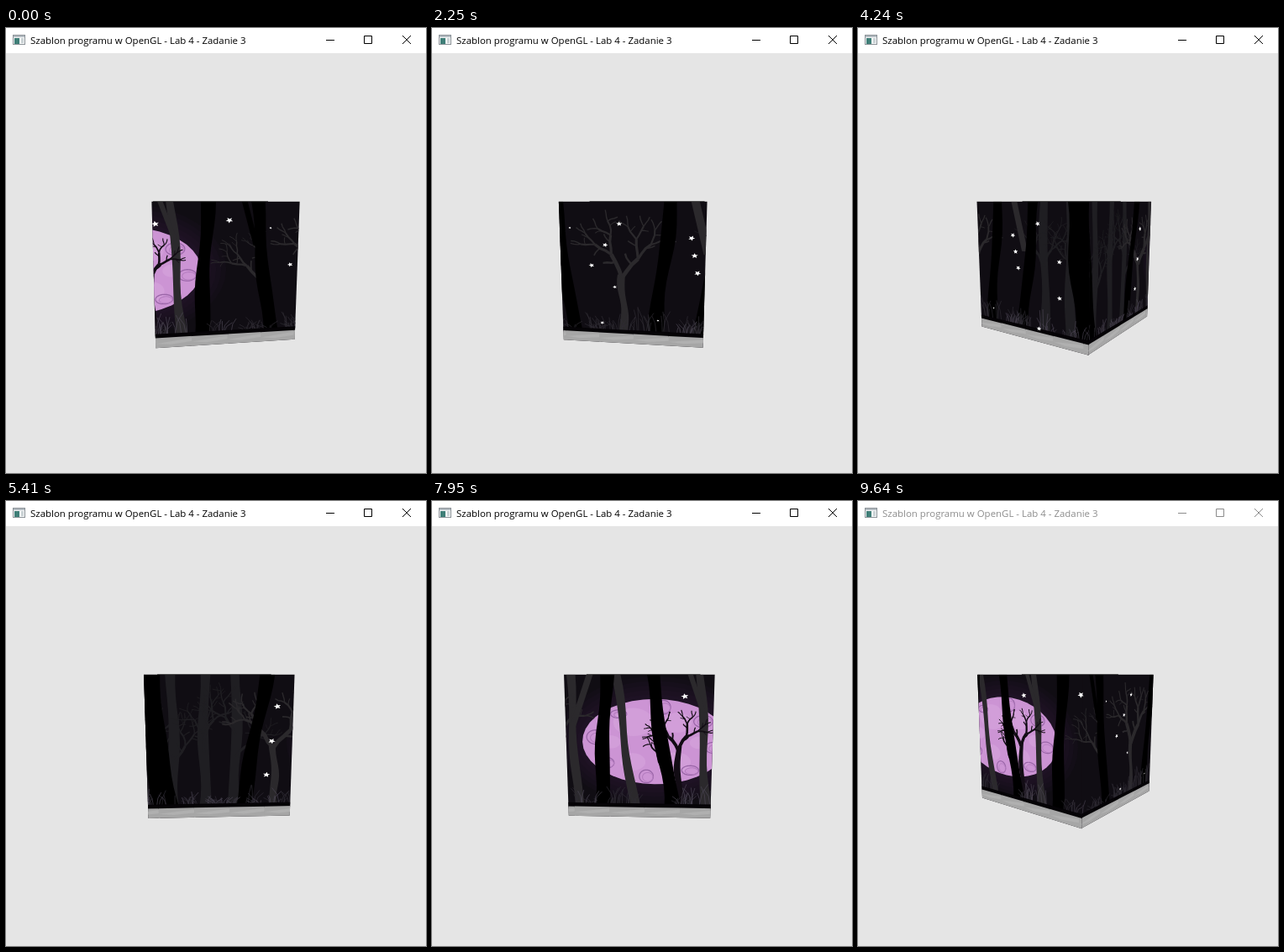
An HTML page with a canvas for the animation above (9720 ms loop, 500 by 530 pixels).

```html
<!DOCTYPE html>
<html lang="pl">
<head>
<meta charset="utf-8">
<title>Szablon programu w OpenGL</title>
<style>
html, body { margin: 0; width: 100%; height: 100%; overflow: hidden; background: #e5e5e5; }
canvas, svg { position: absolute; left: 0; top: 0; display: block; }
text { font: 11.45px "Open Sans", "Noto Sans", sans-serif; }
</style>
</head>
<body>
<canvas id="view" width="500" height="530"></canvas>
<svg width="500" height="30" viewBox="0 0 500 30">
  <rect width="500" height="30" fill="#fff"/>
  <rect x="8.5" y="8.5" width="14" height="11" fill="#f4f6f7" stroke="#8b9297"/>
  <rect x="9" y="9" width="13" height="2" fill="#b4bcc2"/>
  <rect x="10" y="12" width="6" height="7" fill="#3f7f78"/>
  <rect x="18" y="12" width="3" height="6" fill="#ccd3d6"/>
  <g id="bar">
    <text x="29" y="19">Szablon programu w OpenGL - Lab 4 - Zadanie 3</text>
    <path d="M381 14.5h10M426.5 9.5h9v9h-9zM472 9l10 10M482 9l-10 10" fill="none" stroke="#000"/>
  </g>
</svg>
<script>
const LOOP = 9720, STEP = 76.5, FOCAL = 440, DIST = 6, WRAP = 8;
const TILT = Math.atan(1 / DIST), C = Math.cos(TILT), S = Math.sin(TILT);
const FLOOR = 1.857, MOON = { x: 6.63, y: 0.92, rx: 1, ry: 0.595 };
const FAR = '#1f1e22', GRAY = '#2b292c', BLACK = '#000', INK = '#120c14';
const ctx = document.getElementById('view').getContext('2d');
const bar = document.getElementById('bar');

let seed = 11;
const rnd = (a = 0, b = 1) => {
  seed = (seed * 16807) % 2147483647;
  return a + (b - a) * seed / 2147483647;
};

// The forest is a strip: x runs 0..8 round the box, y runs 0..2 downwards.
const shapes = [];
function add(pts, color, width = 0, alpha = 1) {
  const xs = pts.map(p => p[0]);
  const lo = Math.min(...xs), hi = Math.max(...xs);
  shapes.push({ pts, color, width, alpha, mid: (lo + hi) / 2, half: (hi - lo) / 2 });
}

function oval(x, y, rx, ry, color, width, alpha) {
  const pts = [];
  for (let i = 0; i <= 40; i++) {
    const a = i * Math.PI / 20;
    pts.push([x + rx * Math.cos(a), y + ry * Math.sin(a)]);
  }
  add(pts, color, width, alpha);
}

function trunk(top, lean, size, color, from = 0) {
  const left = [], right = [], p = rnd(0, 6);
  for (let i = 0; i <= 12; i++) {
    const k = i / 12, y = from + (FLOOR - from) * k;
    const x = top + lean * k + 0.02 * Math.sin(p + k * 7);
    const w = size / 2 * (0.9 + 0.12 * Math.sin(p * 2 + k * 9) + 0.3 * k ** 5);
    left.push([x - w, y]);
    right.unshift([x + w, y]);
  }
  add(left.concat(right), color);
}

function fork(x, y, lean, size, color) {
  add([[x - size / 2, y], [x + size / 2, y], [x + lean + size / 2, 0], [x + lean - size / 2, 0]], color);
}

function twig(x, y, angle, len, width, depth, color) {
  const pts = [[x, y]];
  let a = angle;
  for (let i = 0; i < 3; i++) {
    a += rnd(-0.35, 0.35);
    x += Math.sin(a) * len / 3;
    y -= Math.cos(a) * len / 3;
    pts.push([x, y]);
  }
  add(pts, color, width);
  if (!depth) return;
  const next = side => twig(x, y, angle + side * rnd(0.2, 0.6), len * 0.75, width * 0.66, depth - 1, color);
  next(-1);
  next(1);
  twig(...pts[2], angle + (rnd() < 0.5 ? -0.9 : 0.9), len * 0.5, width * 0.5, 0, color);
}

function tree(x, y, reach, width, color) {
  trunk(x, 0.03, width * 2, color, y - 0.05);
  twig(x, y, -0.6, reach, width, 3, color);
  twig(x, y, 0.45, reach, width, 3, color);
}

function star(x, v, r) {
  const pts = [], turn = rnd(0, 6);
  for (let i = 0; i < 10; i++) {
    const a = turn + i * Math.PI / 5, q = r / 95 * (i % 2 ? 0.45 : 1);
    pts.push([x + q * Math.cos(a), v * 2 + 0.75 * q * Math.sin(a)]);
  }
  add(pts, '#fff');
}

function starRow(n, x, v, dx, dv, r) {
  for (let i = 0; i < n; i++) star(x + dx * i, v + dv * i, r);
}

function buildMoon() {
  const { x, y, rx, ry } = MOON;
  for (let i = 5; i; i--) oval(x, y, rx + i * 0.07, ry + i * 0.06, '#4a2a50', 0, 0.06);
  oval(x, y, rx, ry, '#cc94d4');
  for (let i = 0; i < 6; i++) {
    const a = i * 1.05, w = rnd(0.12, 0.3);
    oval(x + 0.6 * Math.cos(a), y + 0.32 * Math.sin(a), w, w * 0.7, '#d7a5de', 0, 0.6);
  }
  // a ring of craters just inside the rim
  for (let i = 0; i < 8; i++) {
    const a = 0.14 + i * Math.PI / 4, w = rnd(0.08, 0.16), h = rnd(0.05, 0.11);
    const cx = x + 0.82 * rx * Math.cos(a), cy = y + 0.82 * ry * Math.sin(a);
    oval(cx, cy, w, h, '#9a66a8', 0.015);
    oval(cx + 0.02, cy + 0.01, w * 0.75, h * 0.7, '#b57dc0', 0.012);
  }
}

function buildTrees() {
  for (let x = 2.85; x < 4.7; x += 0.43) {
    trunk(x, 0, 0.15, FAR);
    twig(x, rnd(0.8, 1.2), -0.5, 0.28, 0.035, 3, FAR);
    twig(x, rnd(0.8, 1.2), 0.5, 0.28, 0.035, 3, FAR);
  }
  twig(0.48, 1.1, -0.8, 0.3, 0.04, 3, GRAY);
  twig(0.45, 0.9, -0.4, 0.2, 0.03, 3, GRAY);

  for (const x of [5.48, 6.1, 7.23]) trunk(x, x < 6 ? 0.07 : x < 7 ? 0.25 : 0.13, 0.12, GRAY);
  fork(5.5, 0.7, 0.25, 0.09, GRAY);
  fork(7.28, 0.5, -0.18, 0.07, GRAY);
  fork(2.5, 0.7, -0.18, 0.11, GRAY);
  tree(1.33, 1.05, 0.36, 0.055, GRAY);
  tree(5.1, 1, 0.33, 0.055, GRAY);
  tree(6.95, 1.02, 0.22, 0.045, INK);
  twig(6.72, 1.25, -0.75, 0.2, 0.03, 2, INK);

  // top position and lean of each black trunk
  [[7.72, -0.09], [0.4, 0.22], [2, -0.2], [2.68, -0.24], [4.98, -0.3], [5.97, -0.09], [6.59, 0.29]]
    .forEach(([x, lean]) => trunk(x, lean, 0.2, BLACK));
  trunk(3.38, 0.17, 0.37, BLACK);
  fork(0.4, 0.6, -0.17, 0.08, BLACK);
}

function buildGround() {
  for (let i = 0; i < 60; i++) {
    const x = rnd(0, WRAP), tall = rnd(0.08, 0.32), tone = rnd() < 0.6 ? '#2f2c34' : '#4c4654';
    for (let j = 0; j < 5; j++) {
      const bx = x + rnd(-0.1, 0.1), h = tall * rnd(0.5, 1.2), lean = rnd(-0.12, 0.12);
      add([[bx, 1.83], [bx + lean * 0.3, 1.83 - h * 0.6], [bx + lean, 1.83 - h]], tone, 0.008);
    }
  }
  for (let x = 0; x < WRAP; x += 0.5) {
    const slab = (y0, y1, color) => add([[x - 0.01, y0], [x + 0.51, y0], [x + 0.51, y1], [x - 0.01, y1]], color);
    slab(1.8, FLOOR + 0.01, '#050306');
    slab(FLOOR, 2.03, '#a6a6a6');
    add([[x, 1.94], [x + 0.5, 1.88], [x + 0.5, 1.93], [x + 0.2, 1.96]], '#b0b0b0');
  }
}

function buildStars() {
  starRow(2, 0.02, 0.125, -0.99, 0.02, 5);
  starRow(3, 1.3, 0.15, -0.2, 0.145, 4);
  starRow(2, 1.23, 0.59, -0.19, 0.265, 3);
  starRow(3, 2.28, 0.24, 0.045, 0.118, 4.5);
  starRow(3, 5.14, 0.215, -0.065, 0.24, 5);
  starRow(2, 0.6, 0.18, 1.24, 0.64, 2);
  for (let i = 0; i < 4; i++) star(2.74 + 0.42 * Math.sin(i * Math.PI / 3), 0.15 + 0.25 * i, 4.3);
}

buildMoon();
buildTrees();
buildGround();
buildStars();

function projector(phi) {
  const sn = Math.sin(phi), cs = Math.cos(phi);
  return (u, y) => {
    const d = DIST - cs + u * sn, depth = d * C + y * S;
    return [250 + FOCAL * (sn + u * cs) / depth, 280 + FOCAL * (y * C - d * S) / depth];
  };
}

function trace(pts) {
  ctx.beginPath();
  pts.forEach(p => ctx.lineTo(p[0], p[1]));
}

function drawFace(phi, start) {
  const at = projector(phi), edge = 1.008;
  ctx.save();
  trace([at(-edge, 0), at(edge, 0), at(edge, 2), at(-edge, 2)]);
  ctx.closePath();
  ctx.fillStyle = '#100d13';
  ctx.fill();
  ctx.clip();
  const scale = 87 * (0.4 + 0.6 * Math.cos(phi));
  for (const s of shapes) {
    const shift = Math.round((start - s.mid) / WRAP) * WRAP - start;
    if (Math.abs(s.mid + shift) > 1 + s.half + 0.1) continue;
    trace(s.pts.map(p => at(p[0] + shift, p[1])));
    ctx.globalAlpha = s.alpha;
    if (s.width) {
      ctx.strokeStyle = s.color;
      ctx.lineWidth = Math.max(0.6, s.width * scale);
      ctx.stroke();
    } else {
      ctx.fillStyle = s.color;
      ctx.fill();
    }
  }
  ctx.restore();
}

// Thin sliver of the lid, seen almost edge-on.
function drawLid(spin) {
  let lo = 500, hi = 0;
  for (let k = 0; k < 4; k++) {
    const phi = spin + k * Math.PI / 2, at = projector(phi);
    for (let u = -1; u <= 1; u += 0.02) {
      if (Math.cos(phi) - u * Math.sin(phi) > -0.58) continue;
      const x = at(u, 0)[0];
      lo = Math.min(lo, x);
      hi = Math.max(hi, x);
    }
  }
  ctx.fillStyle = '#4c4c4c';
  ctx.fillRect(lo, 206, hi - lo, 1);
}

function draw(ms) {
  const t = Math.floor(ms / STEP + 0.1) * STEP / 1000;
  const spin = (9.3 + 32.45 * t) * Math.PI / 180;
  ctx.fillStyle = '#e5e5e5';
  ctx.fillRect(0, 0, 500, 530);
  for (let k = 0; k > -6; k--) {
    const phi = spin + k * Math.PI / 2;
    if (Math.abs(phi) < Math.PI / 2 && DIST * Math.cos(phi) > 1) drawFace(phi, 2 * k + 1.56 * t);
  }
  drawLid(spin);
  bar.setAttribute('opacity', ms >= 9600 ? 0.45 : 1);
}

const begin = performance.now();
function tick() {
  draw((performance.now() - begin) % LOOP);
  requestAnimationFrame(tick);
}
tick();
</script>
</body>
</html>
```
